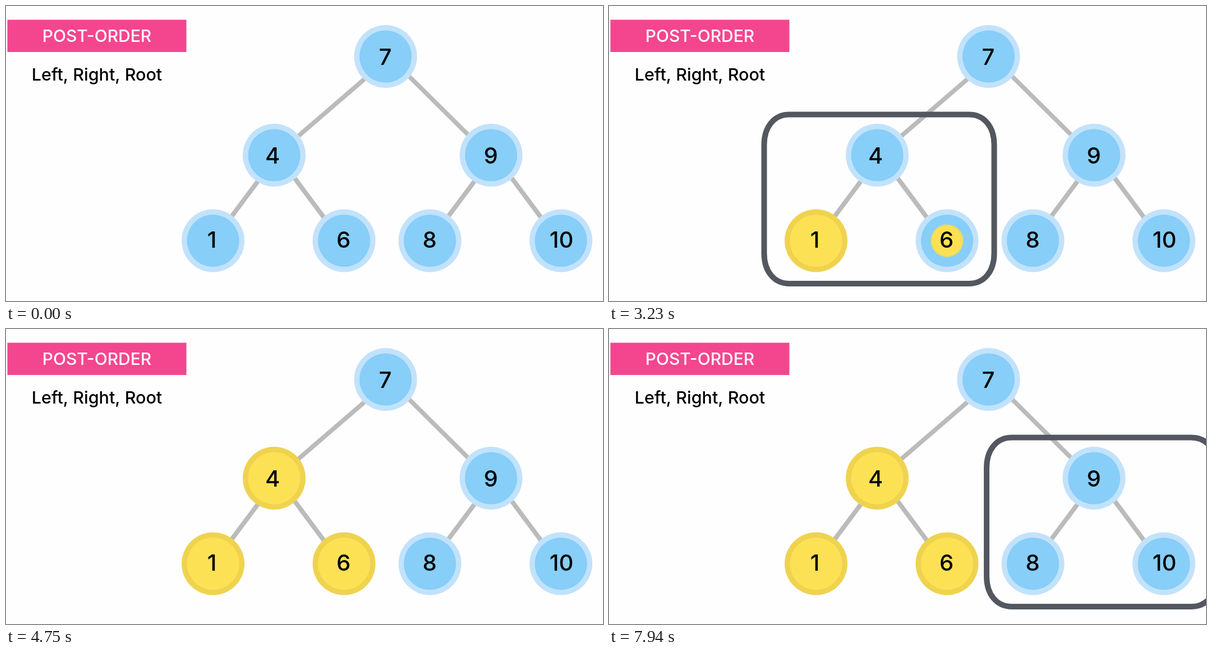
These frames come from a looping animation (1064x526 px, 8 s). An HTML page with a canvas:

```html
<!DOCTYPE html>
<html lang="en">
<head>
<meta charset="utf-8">
<title>Post-order traversal</title>
<style>
  html, body { margin: 0; width: 100%; height: 100%; overflow: hidden; background: #fefefe; }
  canvas { display: block; width: 1064px; height: 526px; }
</style>
</head>
<body>
<canvas id="stage" width="1064" height="526"></canvas>
<script>
const ctx = document.getElementById('stage').getContext('2d');
const LOOP = 8000;
const FONT = 'Inter, "Open Sans", sans-serif';
const BLUE = { fill: '#87cef8', ring: '#c2e2fb' };
const YELLOW = { fill: '#fde154', ring: '#efd34f' };
const OUTER = 56, INNER = 46.5;

// x, y: centre; tx, ty: middle and baseline of the label; visit: start of the colour reveal
const nodes = [
  { label: '7', x: 676.5, y: 90, tx: 676, ty: 105 },
  { label: '4', x: 478, y: 266, tx: 475, ty: 281, visit: 3360 },
  { label: '9', x: 864.5, y: 266, tx: 864, ty: 281 },
  { label: '1', x: 369, y: 418.5, tx: 367, ty: 431, visit: 2840 },
  { label: '6', x: 602.5, y: 418.5, tx: 601.5, ty: 431, visit: 3100 },
  { label: '8', x: 755.5, y: 418.5, tx: 755, ty: 431 },
  { label: '10', x: 989, y: 418.5, tx: 990, ty: 431 }
];
const REVEAL = 260;

const edges = [
  [645, 125, 515, 237], [714, 121, 829, 235],
  [453, 307, 397, 382], [510, 301, 571, 383],
  [839, 307, 783, 382], [897, 301, 958, 383]
];

const boxes = [
  { x: 276.5, draw: [180, 365], erase: [3690, 394] },
  { x: 673, draw: [5792, 370] }
];
const TOP = 193.5, WIDTH = 410, HEIGHT = 301.5;
const RX = 45, RY = 54, BEND = 0.6;

const progress = (t, start, span) => Math.min(1, Math.max(0, (t - start) / span));

function cornerLength() {
  const c = 1 - BEND;
  let sum = 0, px = 0, py = RY;
  for (let i = 1; i <= 40; i++) {
    const u = i / 40, v = 1 - u;
    const x = 3 * v * u * u * RX * c + u ** 3 * RX;
    const y = v ** 3 * RY + 3 * v * v * u * RY * c;
    sum += Math.hypot(x - px, y - py);
    px = x;
    py = y;
  }
  return sum;
}
const PERIMETER = 2 * (WIDTH - 2 * RX) + 2 * (HEIGHT - 2 * RY) + 4 * cornerLength();

// Clockwise from the end of the top left corner
function boxPath(l) {
  const r = l + WIDTH, t = TOP, b = TOP + HEIGHT;
  const cx = RX * (1 - BEND), cy = RY * (1 - BEND);
  const p = new Path2D();
  p.moveTo(l + RX, t);
  p.lineTo(r - RX, t);
  p.bezierCurveTo(r - cx, t, r, t + cy, r, t + RY);
  p.lineTo(r, b - RY);
  p.bezierCurveTo(r, b - cy, r - cx, b, r - RX, b);
  p.lineTo(l + RX, b);
  p.bezierCurveTo(l + cx, b, l, b - cy, l, b - RY);
  p.lineTo(l, t + RY);
  p.bezierCurveTo(l, t + cy, l + cx, t, l + RX, t);
  return p;
}

function drawBox(box, t) {
  const head = progress(t, ...box.draw);
  const tail = box.erase ? progress(t, ...box.erase) : 0;
  if (head <= tail) return;
  ctx.save();
  if (head < 1 || tail > 0) {
    ctx.setLineDash([PERIMETER * (head - tail), PERIMETER * 2]);
    ctx.lineDashOffset = -PERIMETER * tail;
  }
  ctx.strokeStyle = '#53575f';
  ctx.lineWidth = 10;
  ctx.stroke(boxPath(box.x));
  ctx.restore();
}

function disc(x, y, r, color) {
  ctx.fillStyle = color;
  ctx.beginPath();
  ctx.arc(x, y, r, 0, Math.PI * 2);
  ctx.fill();
}

function paintNode({ x, y }, colors) {
  disc(x, y, OUTER, colors.ring);
  disc(x, y, INNER, colors.fill);
}

// Circular wipe with a slightly soft rim
function reveal(node, radius) {
  for (const [grow, alpha] of [[1, 0.5], [-1, 1]]) {
    ctx.save();
    ctx.globalAlpha = alpha;
    ctx.beginPath();
    ctx.arc(node.x, node.y, Math.max(0, radius + grow), 0, Math.PI * 2);
    ctx.clip();
    paintNode(node, YELLOW);
    ctx.restore();
  }
}

function text(str, x, y, size, color) {
  ctx.font = `500 ${size}px ${FONT}`;
  ctx.fillStyle = color;
  ctx.fillText(str, x, y);
}

function drawNode(node, t) {
  const p = node.visit ? progress(t, node.visit, REVEAL) : 0;
  paintNode(node, p < 1 ? BLUE : YELLOW);
  if (p > 0 && p < 1) reveal(node, p * OUTER);
  text(node.label, node.tx, node.ty, 40, '#000');
}

function render(t) {
  ctx.fillStyle = '#fefefe';
  ctx.fillRect(0, 0, 1064, 526);
  ctx.textAlign = 'center';

  ctx.fillStyle = '#f4468f';
  ctx.fillRect(2.5, 24.5, 319, 57.5);
  text('POST-ORDER', 162, 64, 30, '#fff');
  text('Left, Right, Root', 162, 133, 30.5, '#000');

  ctx.strokeStyle = '#bbb';
  ctx.lineWidth = 8;
  for (const [x1, y1, x2, y2] of edges) {
    ctx.beginPath();
    ctx.moveTo(x1, y1);
    ctx.lineTo(x2, y2);
    ctx.stroke();
  }
  for (const node of nodes) drawNode(node, t);
  for (const box of boxes) drawBox(box, t);
}

const began = performance.now();
function tick() {
  render((performance.now() - began) % LOOP);
  requestAnimationFrame(tick);
}
tick();
</script>
</body>
</html>
```
